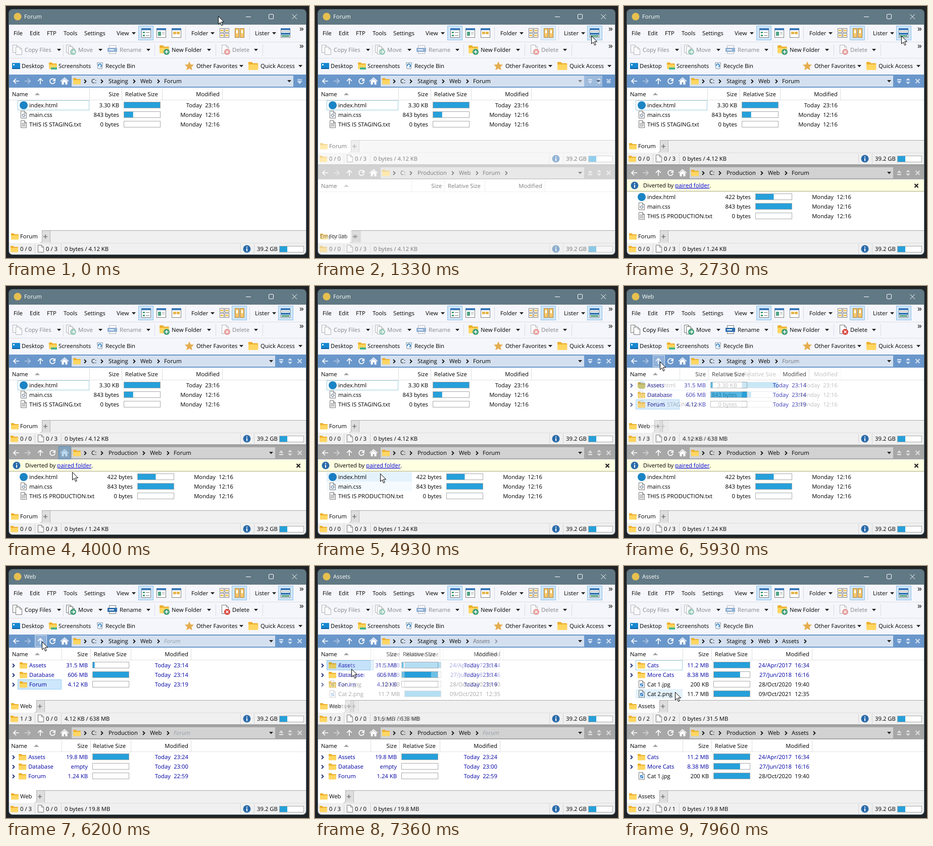
An HTML page for the animation above (8000 ms loop, 600x500 px).

```html
<!DOCTYPE html>
<html lang="en">
<head>
<meta charset="utf-8">
<title>File manager</title>
<style>
html, body { margin: 0; width: 100%; height: 100%; overflow: hidden; background: #202326; }
svg { display: block; }
text { font: 11.3px "Open Sans", "Noto Sans", sans-serif; fill: #000; white-space: pre; text-rendering: geometricPrecision; }
.end { text-anchor: end; }
.dir { fill: #0000a4; }
.ghost { font-style: italic; fill: #98a1ac; }
.off { fill: #85878c; }
.mul { mix-blend-mode: multiply; }
#title text { fill: #fff; }
</style>
</head>
<body>
<svg id="stage" width="600" height="500" viewBox="0 0 600 500"></svg>
<script>
const LOOP = 8000;
const BLUE = '#26a0da';
const stage = document.getElementById('stage');

// Drawing helpers
const T = (x, y, s, c = '') => `<text x="${x}" y="${y}" class="${c}">${s}</text>`;
const R = (x, y, w, h, fill, more = '') => `<rect x="${x}" y="${y}" width="${w}" height="${h}" fill="${fill}" ${more}/>`;
const box = (x, y, w, h, fill, line) => R(x + .5, y + .5, w - 1, h - 1, fill, `stroke="${line}"`);
const F = (d, fill) => `<path d="${d}" fill="${fill}"/>`;
const L = (d, line, w = 1, fill = 'none') => `<path d="${d}" fill="${fill}" stroke="${line}" stroke-width="${w}"/>`;
const C = (x, y, r, fill) => `<circle cx="${x}" cy="${y}" r="${r}" fill="${fill}"/>`;
const G = (s, id = '', more = '') => `<g ${id && `id="${id}"`} ${more}>${s}</g>`;
const at = (x, y, s, k = 1) => G(s, '', `transform="translate(${x} ${y}) scale(${k})"`);
const drop = (x, y, c = '#222') => F(`M${x - 4} ${y - 2}h8l-4 4.5z`, c);
const chev = (x, y, c = '#111') => L(`M${x - 2} ${y - 3}l3.5 3.5l-3.5 3.5`, c, 1.8);
const vline = (x, y, h, c = '#d9dbe2') => R(x, y, 1, h, c);

const folder = (x, y, k = 1) => at(x, y,
  F('M0 1Q0 0 1 0H5.5L7 2H14Q15 2 15 3V11H0z', '#eeb02f') +
  F('M0 4H15V11Q15 12.5 14 12.5H1Q0 12.5 0 11z', '#ffd661'), k);
const page = (x, y, w = 12, h = 15) =>
  L(`M${x + .5} ${y + .5}h${w - 5}l4 4v${h - 5}h${1 - w}z`, '#777', 1, '#fff') + L(`M${x + w - 4.5} ${y + .5}v4h4`, '#777');
const info = (x, y) => C(x, y, 7.5, '#2b6cab') + R(x - 1, y - 1, 2, 5.5, '#fff') + R(x - 1, y - 4.5, 2, 2, '#fff');

// Row icons, drawn around y
const icons = {
  web: y => C(35, y, 8, '#1b84c4'),
  css: y => page(29, y - 8) + `<circle cx="35" cy="${y + 1}" r="2.6" fill="none" stroke="#6b7f93" stroke-width="1.8" stroke-dasharray="1.5 .6"/>`,
  txt: y => page(29, y - 8) + L(`M31 ${y - 2.5}h8m-8 2h8m-8 2h8m-8 2h8`, '#888', .9),
  img: y => page(29, y - 8) + R(32, y - 2, 6, 6, '#2d7cc4') + L(`M33 ${y + 3}l4 -4`, '#fff', 1.2),
  dir: y => folder(27, y - 6)
};

function bar(x, y, part) {
  return box(x, y, 73, 13, '#fff', '#a9a9a9') + (part ? R(x + 1, y + 1, 71 * part, 11, BLUE) : '');
}

function row([kind, name, size, part, day, time], y, s) {
  const c = kind === 'dir' ? 'dir' : '';
  return (c && chev(15, y, '#1c2c78')) +
    G(icons[kind](y) + T(46, y + 4, name, c), '', 'class="slide"') +
    T(s - 5, y + 4, size, c + ' end') + bar(s + 4, y - 7, part) +
    T(s + 159, y + 4, day, c + ' end') + T(s + 194, y + 4, time, c + ' end');
}

function navIcons(y) {
  const w = '#fff';
  return L(`M26 ${y}H15m5 -5l-5 5l5 5`, w, 1.7) +
    G(L(`M37 ${y}h11m-5 -5l5 5l-5 5`, w, 1.7), '', 'opacity=".5"') +
    L(`M68 ${y + 6}v-11m-5 5l5 -5l5 5`, w, 1.7) +
    L(`M96 ${y - 3}a5 5 0 1 0 1 4`, w, 1.7) + F(`M98 ${y - 6}v6h-6z`, w) +
    L(`M108 ${y + .5}l8 -7l8 7`, w, 1.6) + F(`M110.500 ${y}l5.500 -4.500l5.500 4.500v7h-4v-4.500h-3v4.500h-4z`, w);
}

function sideIcons(y, single, lower, c) {
  if (single) return R(577, y - 4, 9, 1.5, c) + R(577, y - 1, 9, 1.5, c) + F(`M577 ${y + 1}h9l-4.500 4.500z`, c);
  return (lower
    ? F(`M540.500 ${y}h9l-4.500 -5z`, c) + R(541, y + 2, 8, 2.5, c)
    : R(541, y - 4, 8, 2.5, c) + F(`M540.500 ${y}h9l-4.500 5z`, c)) +
    F(`M558 ${y - 1.5}h9l-4.500 -4.500zM558 ${y + 1.5}h9l-4.500 4.500z`, c) +
    L(`M577.500 ${y - 4}l8 8m0 -8l-8 8`, c, 2);
}

function status(y, [dirs, files, size]) {
  return folder(9, y - 6) + T(28, y + 4, dirs) + page(63, y - 8) + T(79, y + 4, files) +
    G(T(116, y + 4, size), '', 'class="size"') + info(477, y) + T(497, y + 4, '39.2 GB') +
    box(541, y - 6, 49, 13, '#fff', '#a9a9a9') + R(542, y - 5, 15, 11, BLUE) +
    [57, 109, 464, 491].map(x => vline(x, y - 10, 20, '#d4d4d4')).join('');
}

// One file pane: y shifts the top part, b is the centre of its tab strip
function pane({ y = 0, b, single, path, marks, n, s, rows, tab, plus, stat, focus, sel }) {
  const lower = y > 0, m = 149 + y, h = 175 + y;
  const right = single ? 569 : 533;
  const top = 136 + y - (lower ? 4 : 0);
  let o = R(6, top, 588, b + 37 - top, '#fff');
  if (lower) o += R(6, 314, 588, 4, '#a0a0a0');
  o += R(6, 136 + y, 588, 26, lower ? '#a7a7a7' : '#6a97cb') + navIcons(m);
  o += R(130, 138 + y, right - 130, 22, lower ? '#d2d2d2' : '#d4e0ef');
  o += folder(133, m - 6) + [157, 190, ...marks].map(x => chev(x, m)).join('') + T(169, m + 4, 'C:');
  o += path.map(([x, t, c]) => T(x, m + 4, t, c)).join('') + drop(right - 8, m);
  o += sideIcons(m, single, lower, lower ? '#dedede' : '#d3e2f3');
  o += G(T(12, h + 4, 'Name') + F(`M57 ${h + 2}h10l-5 -5z`, '#a3a3a3') + T(s + 7, h + 4, 'Relative Size'), '', 'class="slide"') +
    T(s - 5, h + 4, 'Size', 'end') + T(s + 194, h + 4, 'Modified', 'end') +
    [n, s, s + 80, s + 199].map(x => vline(x, 163 + y, 24, '#dcdcdc')).join('') + R(6, 186 + y, 588, 1, '#e2e2e2');
  if (focus) o += box(23, 187 + y, n - 23, 20, '#fff', '#9ccddd');
  if (sel) o += G(box(23, 225, n - 23, 20, '#cee7fc', '#9accf3'), 'sel');
  o += rows.map((r, i) => row(r, 197 + y + 19 * i, s)).join('');
  const t = plus - 6;
  o += R(6, b - 12, 588, 49, '#f0f0f0') + R(6, b - 12, 588, 1, '#a8a8a8');
  o += R(t, b - 11, 17, 23, '#dedede') + vline(t + 16, b - 11, 23, '#b8b8b8');
  o += F(`M6 ${b - 12}H${t}V${b + 9}q0 4 -4 4H6z`, '#fff') + L(`M${t + .5} ${b - 11}v20q0 4 -4 4`, '#b0b0b0');
  o += L(`M${plus - 3} ${b + .5}h8m-4 -4v8`, '#777', 1.6);
  o += tab === 'Empty Tab' ? T(10, b + 4, tab) : folder(10, b - 6) + T(28, b + 4, tab);
  o += R(t, b + 13, 594 - t, 1, '#dcdcdc');
  return o + (stat ? status(b + 25, stat) : '');
}

const topPath = (name, c) => [[203, 'Staging'], [266, 'Web'], [313, name, c]];
const lowPath = (name, c) => [[203, 'Production'], [285, 'Web'], [332, name, c]];
const staging = {
  path: topPath('Forum'), marks: [254, 302], n: 165, s: 229, tab: 'Forum', plus: 77, focus: true,
  stat: ['0 / 0', '0 / 3', '0 bytes / 4.12 KB'],
  rows: [
    ['web', 'index.html', '3.30 KB', 1, 'Today', '23:16'],
    ['css', 'main.css', '843 bytes', .25, 'Monday', '12:16'],
    ['txt', 'THIS IS STAGING.txt', '0 bytes', 0, 'Monday', '12:16']
  ]
};
const production = {
  y: 182, b: 457, path: lowPath('Forum'), marks: [273, 321], n: 191, s: 256, tab: 'Forum', plus: 77,
  stat: ['0 / 0', '0 / 3', '0 bytes / 1.24 KB'],
  rows: [
    ['web', 'index.html', '422 bytes', .5, 'Monday', '12:16'],
    ['css', 'main.css', '843 bytes', 1, 'Monday', '12:16'],
    ['txt', 'THIS IS PRODUCTION.txt', '0 bytes', 0, 'Monday', '12:16']
  ]
};
const blank = { ...production, marks: [273, 321, 379], rows: [], tab: 'Empty Tab', plus: 80, stat: null };
const webTop = {
  b: 278, path: topPath('Forum', 'ghost'), marks: [254, 302], n: 110, s: 167, tab: 'Web', plus: 66, sel: true,
  stat: ['1 / 3', '0 / 0', '4.12 KB / 638 MB'],
  rows: [
    ['dir', 'Assets', '31.5 MB', .05, 'Today', '23:14'],
    ['dir', 'Database', '606 MB', 1, 'Today', '23:14'],
    ['dir', 'Forum', '4.12 KB', 0, 'Today', '23:19']
  ]
};
const webLow = {
  ...webTop, y: 182, b: 457, path: lowPath('Forum', 'ghost'), marks: [273, 321], sel: false,
  stat: ['0 / 3', '0 / 0', '0 bytes / 19.8 MB'],
  rows: [
    ['dir', 'Assets', '19.8 MB', 1, 'Today', '23:24'],
    ['dir', 'Database', 'empty', 0, 'Today', '23:00'],
    ['dir', 'Forum', '1.24 KB', 0, 'Today', '22:59']
  ]
};
const cats = [
  ['dir', 'Cats', '11.2 MB', 1, '24/Apr/2017', '16:34'],
  ['dir', 'More Cats', '8.38 MB', .73, '27/Jun/2018', '16:16']
];
const assetsTop = {
  b: 278, path: topPath('Assets'), marks: [254, 302, 359], n: 116, s: 173, tab: 'Assets', plus: 76, focus: true,
  stat: ['0 / 2', '0 / 2', '0 bytes / 31.5 MB'],
  rows: [...cats,
    ['img', 'Cat 1.jpg', '200 KB', 0, '28/Oct/2020', '19:40'],
    ['img', 'Cat 2.png', '11.7 MB', 1, '09/Oct/2021', '12:35']]
};
const assetsLow = {
  ...assetsTop, y: 182, b: 457, path: lowPath('Assets'), marks: [273, 321, 377], focus: false,
  stat: ['0 / 2', '0 / 1', '0 bytes / 19.8 MB'],
  rows: [...cats, ['img', 'Cat 1.jpg', '200 KB', 1, '28/Oct/2020', '19:40']]
};

// Toolbars
const lit = (x, id) => G(box(x, 39, 30, 29, '#cfe5f8', '#8fc3ea'), id);
const frame = x => box(x, 44, 19, 19, '#fff', '#808080') + R(x, 44, 19, 4, '#3a78b8');
const more = y => L(`M582 ${y - 3}l3 3l-3 3m3.500 -6l3 3l-3 3`, '#222', 1.2);

function menuRow() {
  let o = [[15, 'File'], [47, 'Edit'], [81, 'FTP'], [114, 'Tools'], [155, 'Settings'], [219, 'View'], [367, 'Folder'], [493, 'Lister']]
    .map(([x, s]) => T(x, 58, s)).join('');
  o += [253, 409, 531].map(x => drop(x, 54)).join('') + [355, 482].map(x => vline(x, 41, 26)).join('');
  o += lit(262) + lit(447, 'litFolder') + lit(539, 'litLister') + [268, 298, 328, 544].map(frame).join('');
  for (const y of [51, 57]) o += R(271, y, 4, 3, '#3d9c74') + R(277, y + 1, 7, 1, '#777');
  o += R(301, 51, 6, 8, '#4fa383') + L('M309 52.500h5m-5 3h5', '#999') + R(331, 51, 6, 5, '#e7b449') + R(338, 51, 6, 5, '#e7b449');
  for (const x of [423, 433]) for (const y of [44, 54]) o += box(x, y, 9, 9, '#fff', '#808080') + R(x + 2, y + 3, 5, 3, '#eebd4d');
  for (const x of [453, 463]) o += box(x, 44, 9, 19, '#f6c668', '#a9823f') + R(x + 3, 48, 3, 6, '#fff');
  o += R(546, 50, 15, 1, '#999') + R(544, 53, 19, 4, '#3a78b8') + R(546, 58, 15, 3, '#49a07c');
  return o + more(46);
}

function editTools(on) {
  const c = on ? '' : 'off';
  const art = page(13, 77, 13, 16) + page(19, 81, 13, 16) + page(119, 77, 13, 16) + page(123, 80, 13, 16) +
    C(133, 91, 6, '#3f9f78') + L('M129.500 91h6m-2.500 -3l3 3l-3 3', '#fff', 1.5) +
    box(204, 78, 14, 17, '#fff', '#777') + R(201, 83, 19, 8, '#2e6fae') + R(204, 86, 10, 2, '#fff') +
    page(427, 77, 14, 18) + C(438, 91, 6, '#d8443c') + L('M435.500 88.500l5 5m0 -5l-5 5', '#fff', 1.6);
  return R(8, 74, 280, 27, '#f5f6fb') + R(422, 74, 66, 27, '#f5f6fb') + G(art, '', `opacity="${on ? 1 : .5}"`) +
    [[37, 'Copy Files'], [143, 'Move'], [225, 'Rename'], [448, 'Delete']].map(([x, s]) => T(x, 91, s, c)).join('') +
    [105, 187, 282].map(x => drop(x, 87)).join('');
}

function favRow() {
  return R(12, 113, 16, 12, '#1687d0', 'rx="1"') + R(14, 115, 3, 3, '#d8f2ff') + R(12, 123, 16, 2, '#0d5f9d') + T(31, 123, 'Desktop') +
    folder(85, 112, 1.05) + R(89, 122, 12, 4, '#43b58d') + T(104, 123, 'Screenshots') +
    L('M180.500 112.500h11l-1.500 12h-8z', '#8497a8', 1, '#eaf3fa') + L('M183 119a3 3 0 1 1 4 2', '#287dc4', 1.6) + T(197, 123, 'Recycle Bin') +
    F('M363 110l2.700 6l6.500 .6l-5 4.300l1.600 6.500l-5.800 -3.500l-5.800 3.500l1.600 -6.500l-5 -4.300l6.500 -.6z', '#e5ad4f') +
    T(377, 123, 'Other Favorites') + drop(466, 119) + folder(480, 111, 1.28) + T(504, 123, 'Quick Access') + drop(583, 119);
}

const chrome = R(6, 7, 588, 30, '#617985') + C(23, 21, 7.5, '#e6c04f') + G(T(36, 25, 'Forum'), 'title') +
  L('M475 21.500h10M566.500 16.500l9.500 9.500m0 -9.500l-9.500 9.500', '#fff') +
  R(520.5, 16.5, 9, 9, 'none', 'stroke="#fff" rx="1.5"') +
  R(6, 37, 588, 99, '#f5f6fb') + R(6, 71, 588, 1, '#dddfe6') + R(6, 103, 588, 1, '#dddfe6') +
  menuRow() + editTools(false) + G(editTools(true), 'enabled') +
  folder(304, 78, 1.25) + C(318, 91, 6, '#3f9f78') + L('M314.500 91h7m-3.500 -3.500v7', '#fff', 1.6) + T(328, 91, 'New Folder') +
  drop(402, 87) + drop(495, 87) + [113, 294, 415, 508].map(x => vline(x, 76, 23)).join('') + more(80) + favRow();

const notice = `<svg id="notice" x="6" y="345" width="588" height="0">` + R(0, 0, 588, 24, '#ffffe1') + R(0, 22, 588, 1, '#a9a98f') +
  info(15, 11) + `<text x="32" y="15">Diverted by <tspan fill="#00d" text-decoration="underline">paired folder</tspan>.</text>` +
  L('M569.500 8l7 7m0 -7l-7 7', '#111', 2) + '</svg>';

// Hover zones: x, y, w, h, kind, first and last moment
const zones = [];
const addRows = (y, count, n, a, z) => {
  for (let i = 0; i < count; i++) zones.push([23, y + 19 * i, n - 23, 19, 'row', a, z]);
};
addRows(187, 3, 165, 0, 5850);
addRows(369, 3, 192, 1500, 5850);
addRows(187, 3, 110, 5850, 7300);
addRows(187, 4, 116, 7300, LOOP);
zones.push([6, 163, 159, 23, 'head', 0, 5800], [104, 318, 24, 26, 'home', 1500, 5800], [57, 137, 24, 24, 'up', 5360, LOOP]);
const looks = {
  row: ['#e4f2fc', '#e4f2fc', 70], head: ['#d9ebf9', '#d9ebf9', 50],
  home: ['#4a9ade88', '#2a83cb', 250], up: ['#ffffff40', '#d4e2f2', 150]
};
const hovers = zones.map(([x, y, w, h, k], i) =>
  G(box(x, y, w, h, looks[k][0], looks[k][1]), 'z' + i, k === 'row' || k === 'head' ? 'class="mul"' : '')).join('');

stage.innerHTML = '<defs><clipPath id="win"><rect x="6" y="7" width="588" height="486" rx="7"/></clipPath></defs>' +
  R(0, 0, 600, 500, '#202326') + R(5, 6, 590, 488, '#52656f', 'rx="8"') +
  G(chrome + G(pane({ ...staging, b: 457, single: true })) +
    G(pane({ ...staging, b: 278 }) + pane(blank), 'dual') +
    G(pane(production), 'loaded') + notice +
    G(pane(webTop), 'webTop') + G(pane(webLow), 'webLow') +
    G(pane(assetsTop), 'assetsTop') + G(pane(assetsLow), 'assetsLow') + hovers, '', 'clip-path="url(#win)"') +
  G('<path d="M.5 .5V16l3.600 -3.400l2.600 6.200l2.500 -1.100l-2.600 -6h5z" fill="#fff" stroke="#000"/>', 'cursor');

// Cursor stops: time, x, y, pace of the way there
const soft = p => p * p * (3 - 2 * p);
const half = p => (p + soft(p)) / 2;
const out = p => 1 - (1 - p) * (1 - p);
const stops = [
  [0, 420, 20], [300, 420, 20], [800, 545, 58], [960, 545, 58], [1000, 547, 59], [1330, 547, 59], [1500, 549, 59],
  [2730, 549, 59], [3360, 116, 240], [3560, 116, 240], [4200, 136, 407], [4830, 136, 407],
  [5360, 86, 165, half], [5600, 71, 150, out], [6260, 71, 150], [6560, 72, 204], [7560, 72, 204], [7930, 101, 250], [LOOP, 101, 250]
];
function cursorAt(t) {
  let i = 1;
  while (i < stops.length - 1 && stops[i][0] <= t) i++;
  const a = stops[i - 1], b = stops[i];
  const p = (b[3] || soft)((t - a[0]) / (b[0] - a[0]));
  return [a[1] + (b[1] - a[1]) * p, a[2] + (b[2] - a[2]) * p];
}

const el = id => document.getElementById(id);
const ramp = (t, a, b) => Math.min(1, Math.max(0, (t - a) / (b - a)));
const fade = (id, v) => el(id).setAttribute('opacity', v);
const titleText = el('title').firstChild;
const sizeText = el('webTop').querySelector('.size text');
const sliders = el('webLow').querySelectorAll('.slide');

function hoverLevel([x, y, w, h, kind, a, z], t) {
  if (t < a || t >= z) return 0;
  const span = looks[kind][2];
  for (let lag = 0; lag < span && lag <= t; lag += 5) {
    const [cx, cy] = cursorAt(t - lag);
    if (cx >= x && cx < x + w && cy >= y && cy < y + h) return 1 - lag / span;
  }
  return 0;
}

function draw(t) {
  const [x, y] = cursorAt(t);
  el('cursor').setAttribute('transform', `translate(${Math.round(x)} ${Math.round(y)})`);
  titleText.textContent = t < 5800 ? 'Forum' : t < 7330 ? 'Web' : 'Assets';
  fade('enabled', t >= 5800 && t < 7330 ? 1 : 0);
  fade('litLister', t >= 960 ? 1 : 0);
  fade('litFolder', ramp(t, 1160, 1500));
  fade('dual', ramp(t, 1160, 1500));
  fade('loaded', ramp(t, 1380, 1500));
  el('notice').setAttribute('height', t < 1700 ? 0 : 4 + 20 * ramp(t, 1830, 2030));
  fade('webTop', ramp(t, 5780, 5980));
  fade('webLow', ramp(t, 5950, 6150));
  const shift = -18 * (1 - ramp(t, 5950, 6230));
  sliders.forEach(g => g.setAttribute('transform', `translate(${shift} 0)`));
  el('sel').setAttribute('transform', `translate(0 ${t < 6700 ? 0 : -38})`);
  sizeText.textContent = t < 6700 ? '4.12 KB / 638 MB' : '31.5 MB / 638 MB';
  fade('assetsTop', ramp(t, 7300, 7480));
  fade('assetsLow', ramp(t, 7370, 7560));
  zones.forEach((z, i) => fade('z' + i, hoverLevel(z, t)));
}

const start = performance.now();
function tick() {
  draw((performance.now() - start) % LOOP);
  requestAnimationFrame(tick);
}
tick();
</script>
</body>
</html>
```
